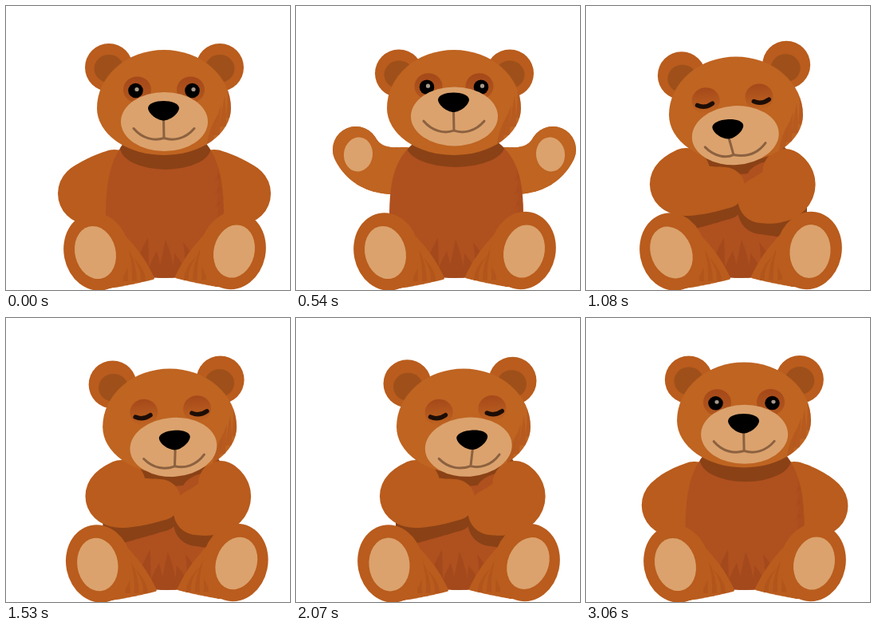
Write an HTML page with a canvas that moves like this. It is 356 by 356 pixels and loops after 3.42 s.

```html
<!DOCTYPE html>
<html lang="en">
<head>
<meta charset="utf-8">
<title>Teddy bear hug</title>
<style>
html, body { margin: 0; width: 100%; height: 100%; overflow: hidden; background: #fff; }
canvas { display: block; width: 356px; height: 356px; }
</style>
</head>
<body>
<canvas id="stage"></canvas>
<script>
const SIZE = 356, LOOP = 3420, STEP = 90, LAST = 34, AXIS = 199;
const canvas = document.getElementById('stage');
const ctx = canvas.getContext('2d');
const dpr = window.devicePixelRatio || 1;
canvas.width = canvas.height = Math.round(SIZE * dpr);

const C = {
  head: '#bf6421', body: '#b95c1d', torso: '#af501f', fur: '#a4491c', streak: 'rgba(164,73,28,.35)',
  shade: '#8a4116', ear: '#9f501a', brow: '#a5481a', skin: '#dba26d', mouth: '#8c6140'
};

// A limb is three discs [x, y, radius]: root, bend and tip.
const REST = [[136, 210, 30], [118, 222, 36], [104, 235, 39]];
const OPEN = [[136, 206, 29], [92, 211, 30], [75, 180, 29]];
const HUG_L = [[138, 208, 30], [100, 238, 40], [186, 228, 26]];
const HUG_R = [[262, 207, 28], [277, 235, 43], [232, 243, 29]];
const THIGH = [[120, 315, 40], [150, 325, 26], [184, 341, 2]];

// Keyframes as [time, value], eased with a half cosine between neighbours.
const HUG = [[540, 0], [1080, 1], [2520, 1], [3060, .05]];
const LIFT = [[0, 0], [540, 1], [1080, 1], [1081, 0]];
const SWAY = [[540, 0], [1080, -1], [1420, 1.05], [1745, -.85], [2070, 1], [2520, 0]];

const mix = (a, b, k) => a + (b - a) * k;
const clamp = v => Math.max(0, Math.min(1, v));
const blend = (p, q, k) => p.map((disc, i) => disc.map((v, j) => mix(v, q[i][j], k)));
const mirror = discs => discs.map(([x, y, r]) => [2 * AXIS - 1 - x, y, r]);
const shift = (discs, dx, dy = 0) => discs.map(([x, y, r]) => [x + dx, y + dy, r]);

function track(keys, t) {
  if (t <= keys[0][0]) return keys[0][1];
  for (let i = 1; i < keys.length; i++) {
    const [t0, a] = keys[i - 1], [t1, b] = keys[i];
    if (t <= t1) return mix(a, b, (1 - Math.cos(Math.PI * (t - t0) / (t1 - t0))) / 2);
  }
  return keys[keys.length - 1][1];
}

// Sweeps a disc along the quadratic curve through root, bend and tip.
function limb([a, b, c]) {
  const path = new Path2D(), n = 60;
  for (let i = 0; i <= n; i++) {
    const k = i / n;
    const [x, y, r] = a.map((v, j) => mix(mix(v, b[j], k), mix(b[j], c[j], k), k));
    path.moveTo(x + r, y);
    path.arc(x, y, r, 0, 2 * Math.PI);
  }
  return path;
}

function fill(path, color) {
  ctx.fillStyle = color;
  ctx.fill(path);
}

function oval(x, y, rx, ry, color, rot = 0) {
  const path = new Path2D();
  path.ellipse(x, y, rx, ry, rot, 0, 2 * Math.PI);
  fill(path, color);
  return path;
}

// A thin tuft of fur from a base point to a tip.
function tuft(x, y, tx, ty, w, color) {
  ctx.beginPath();
  ctx.moveTo(x - w, y);
  ctx.quadraticCurveTo(x - w / 2, (y + ty) / 2, tx, ty);
  ctx.quadraticCurveTo(x + w, (y + ty) / 2, x + w, y);
  ctx.fillStyle = color;
  ctx.fill();
}

function clipped(path, draw) {
  ctx.save();
  ctx.clip(path);
  draw();
  ctx.restore();
}

function torsoPath(cx, w, top, bottom) {
  const path = new Path2D();
  path.moveTo(cx + top - 48, 168);
  path.bezierCurveTo(cx - w + 8, 188, cx - w, 215, cx - w, 265);
  path.lineTo(AXIS - 38 + bottom, 338);
  path.quadraticCurveTo(AXIS + bottom, 344, AXIS + 38 + bottom, 338);
  path.lineTo(cx + w, 265);
  path.bezierCurveTo(cx + w, 215, cx + w - 8, 188, cx + top + 48, 168);
  return path;
}

function drawTorso(path, cx, p) {
  fill(path, C.torso);
  clipped(path, () => {
    for (let i = 0; i < 5; i++) {
      tuft(168 + i * 16 + 5 * p.s, 345, 178 + i * 11 + 5 * p.s, 290 + (i * 17) % 31, 11, C.fur);
      tuft(cx + p.w - 2, 195 + i * 17, cx + p.w - 12, 221 + i * 17, 6, C.streak);
    }
    const wide = Math.max(p.u, p.h);
    oval(200 + 11 * p.s, 177 - 3 * p.u + 6 * p.h, 57 + 5 * wide, 28, C.shade);
  });
}

function drawLeg(side, s) {
  ctx.save();
  ctx.translate(AXIS + 5 * s, side > 0 ? -1.5 : 0);
  ctx.scale(-side, 1);
  ctx.translate(-AXIS, 0);
  const thigh = limb(THIGH), turn = -.24 - side * .15 * s;
  fill(thigh, C.body);
  clipped(thigh, () => {
    for (let i = 0; i < 3; i++) tuft(150 + i * 11, 345, 146 + i * 6, 288 + i * 13, 3, C.streak);
  });
  oval(113.5, 308, 41, 49, C.body, -.2);
  oval(112, 309, 25.5, 33.5, C.skin, turn);
  ctx.restore();
}

function drawEars({ s, h, u }) {
  const rot = (2.15 * s - 3.7 * h) * Math.PI / 180;
  const cx = 198.5 - 3 * h + 10 * s, cy = 77 + 3.5 * h + 7.5 * u;
  const d = 69.5 - 3.5 * Math.abs(s);
  for (const side of [-1, 1]) {
    const x = cx + side * d * Math.cos(rot), y = cy + side * d * Math.sin(rot);
    oval(x, y, 30, 30, C.body);
    oval(x - side * h, y + 1.5 + 2.5 * h, 18.5, 17.5, C.ear);
  }
}

function drawEye(x, y, side, p) {
  const bx = x - side * 2, by = y - mix(1, 4, p.h), shut = p.h > .5;
  const g = ctx.createLinearGradient(0, by - 17, 0, by + 17);
  g.addColorStop(0, C.brow);
  g.addColorStop(1, shut ? C.head : '#b2571d');
  oval(bx, by, 17.5, 16.5, g);
  if (shut) {
    ctx.strokeStyle = '#1d0d06';
    ctx.lineWidth = 5.5;
    ctx.beginPath();
    ctx.moveTo(x - 9, y + 1);
    ctx.quadraticCurveTo(x, y + 6, x + 10, y);
    ctx.stroke();
    return;
  }
  const open = 1 - clamp(p.h * 1.6);
  oval(x, y, 9.3, 2 + 7.3 * open, '#000');
  oval(x + 1.5, y - 1.5, 2.6, 2.6 * open, '#a99a8c');
}

function drawFace(p) {
  const { s, h, u, v } = p;
  for (const side of [-1, 1]) {
    drawEye(3.5 * s + side * (35.5 - 1.5 * u), -15 + 4.3 * v, side, p);
  }
  oval(.5 + 3.5 * s, 24 + 6.6 * v, 54.5, 37, C.skin);

  const mx = 4 * s, mid = 6 * s - h, my = 44.5 + 9.3 * v;
  const nx = -.5 - .7 * h + 10.5 * s, ny = 10 + 10.6 * v;
  ctx.strokeStyle = C.mouth;
  ctx.lineWidth = 3;
  ctx.beginPath();
  ctx.moveTo(mx - 38, my - 12);
  ctx.bezierCurveTo(mx - 27, my + 1, mx - 12, my + 4, mid, my);
  ctx.bezierCurveTo(mx + 12, my + 4, mx + 27, my + 1, mx + 38, my - 12);
  ctx.moveTo(nx, ny + 10);
  ctx.lineTo(mid, my);
  ctx.stroke();

  ctx.save();
  ctx.translate(nx, ny);
  ctx.fillStyle = '#000';
  ctx.beginPath();
  ctx.moveTo(-19.5, -3);
  ctx.bezierCurveTo(-19, -15, 19, -15, 19.5, -3);
  ctx.bezierCurveTo(19, 4, 8, 12.5, 0, 12.5);
  ctx.bezierCurveTo(-8, 12.5, -19, 4, -19.5, -3);
  ctx.fill();
  ctx.restore();
}

function drawHead(p) {
  drawEars(p);
  ctx.save();
  ctx.translate(198 + p.h + 11 * p.s, 121 + 8.5 * p.h);
  // Fuller cheeks: the lower half is flatter than the upper one.
  const skull = new Path2D();
  skull.ellipse(0, 7, 84, 73, 0, Math.PI, 2 * Math.PI);
  skull.ellipse(0, 7, 84, 59, 0, 0, Math.PI);
  fill(skull, C.head);
  clipped(skull, () => {
    for (let i = 0; i < 4; i++) tuft(58 + i * 8, 52 - i * 11, 68 + i * 4, 14 - i * 11, 4, C.streak);
  });
  ctx.rotate(-4 * p.h * Math.PI / 180);
  drawFace(p);
  ctx.restore();
}

function drawArms(left, right, p) {
  for (const arm of [right, left]) {
    const path = limb(arm);
    fill(path, C.body);
    ctx.globalAlpha = p.u;
    fill(path, C.head);
    ctx.globalAlpha = 1;
  }
  const k = clamp((p.u - .3) / .7);
  for (const [arm, side] of [[left, -1], [right, 1]]) {
    const [x, y] = arm[2];
    oval(x - side * 3, y + 6, 18 * k, 21.5 * k, C.skin, -side * .12);
  }
}

function draw(t) {
  const h = track(HUG, t), lift = track(LIFT, t), s = track(SWAY, t);
  const u = lift * (1 - h);
  const p = { h, s, u, v: 1.3 * h - u, w: 74 + 10 * Math.max(u, h) };

  ctx.setTransform(dpr, 0, 0, dpr, 0, 0);
  ctx.fillStyle = '#fff';
  ctx.fillRect(0, 0, SIZE, SIZE);
  ctx.lineCap = ctx.lineJoin = 'round';

  const dx = 12.5 * s, raised = blend(REST, OPEN, lift);
  const left = shift(blend(raised, HUG_L, h), dx);
  const right = shift(blend(mirror(raised), HUG_R, h), dx);
  const cx = AXIS + 2 * Math.max(u, h) + 8 * s;
  const torso = torsoPath(cx, p.w, 5 * s, 5 * s);
  const crossed = h > .3;

  if (!crossed) drawArms(left, right, p);
  drawTorso(torso, cx, p);
  if (crossed) {
    clipped(torso, () => {
      ctx.globalAlpha = clamp((h - .3) / .5);
      for (const arm of [left, right]) fill(limb(shift(arm.slice(1, 2).concat(arm.slice(1)), 0, 14)), C.shade);
      // The chest shows above the crossed arms.
      oval(236 + dx, 206, 22, 10, C.torso, -.35);
      oval(147 + dx, 194, 12, 10, C.torso, .3);
    });
    drawArms(left, right, p);
  }
  drawLeg(-1, s);
  drawLeg(1, s);
  drawHead(p);
}

const start = performance.now();
function tick() {
  const t = (performance.now() - start) % LOOP;
  draw(Math.min(LAST, Math.floor(t / STEP)) * STEP);
  requestAnimationFrame(tick);
}
tick();
</script>
</body>
</html>
```
